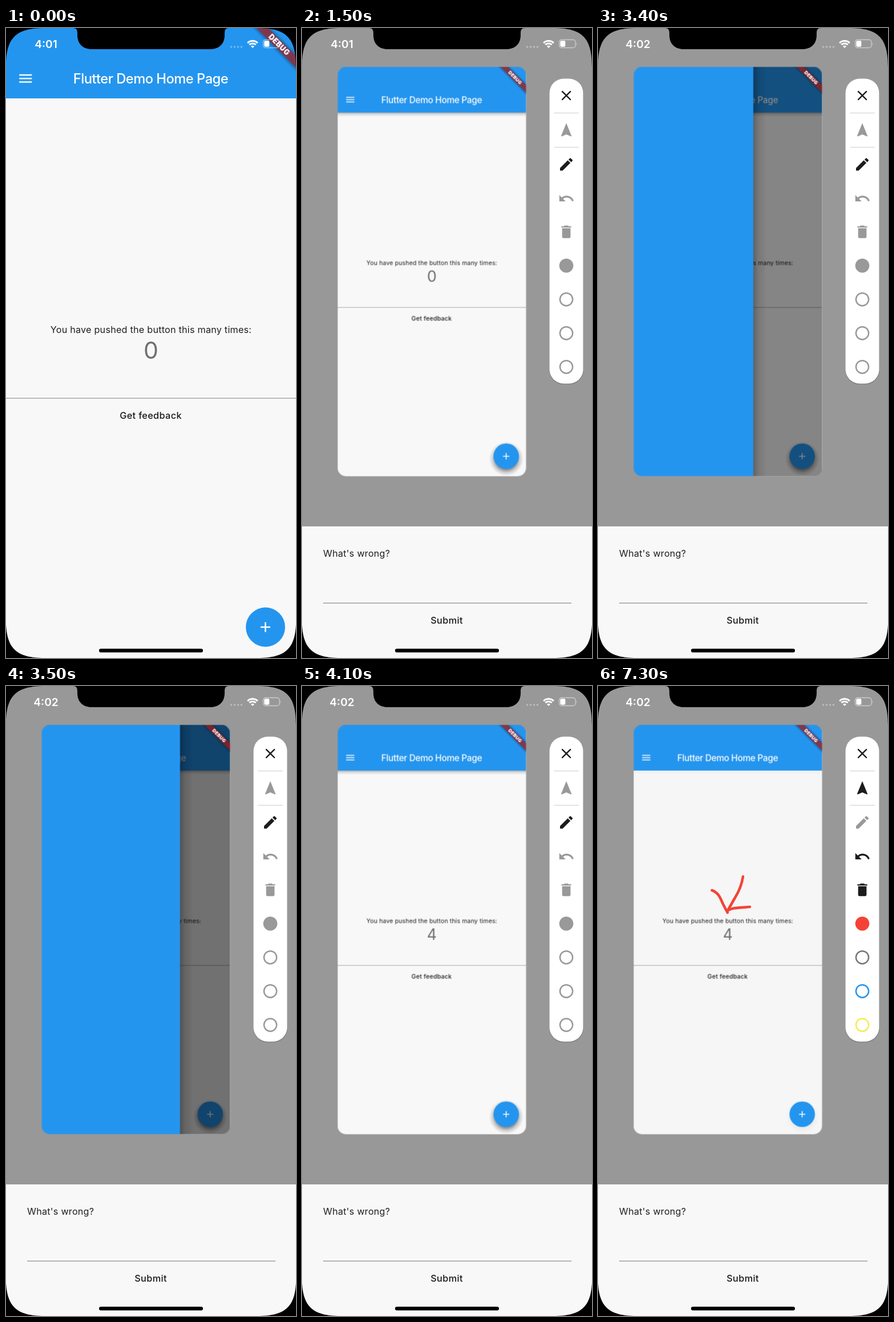
An HTML page that plays this animation: 508x1101 px, repeating every 8000 ms.

```html
<!DOCTYPE html>
<html lang="en">
<head>
<meta charset="utf-8">
<title>Feedback demo</title>
<style>
  html, body { margin: 0; width: 100%; height: 100%; overflow: hidden; background: #989898; }
  svg { display: block; width: 100vw; height: 100vh; font-family: Inter, sans-serif; }
  text { white-space: pre; }
  .mid { text-anchor: middle; }
  .body { font-size: 16.2px; letter-spacing: .22px; fill: #1f1f1f; }
  .btn { font-size: 16.3px; font-weight: 500; letter-spacing: .35px; fill: #1a1a1a; }
  .clock { font-size: 19.2px; font-weight: 600; fill: #fff; }

  /* every part shares one 8 s clock; most changes are hard cuts */
  .card, .round, .press, .shade, .paper, .count, .scrim, .drawer,
  .sheet, .tools, .tool, .early, .late { animation: 8s step-end infinite; }

  .card { animation-name: fit; }
  @keyframes fit {
    0% { transform: translate(0px, 0px) scale(1); }
    17.5% { transform: translate(20px, 38.5px) scale(.917); }
    18.75%, to { transform: translate(62.3px, 67.8px) scale(.65); }
  }
  .round { animation-name: round; }
  @keyframes round { 0% { rx: 0px; ry: 0px; } 17.5% { rx: 5.5px; ry: 5.5px; } 18.75%, to { rx: 23px; ry: 23px; } }
  .press { animation-name: press; }
  @keyframes press { 0% { opacity: 0; } 17.5% { opacity: 1; } 18.75%, to { opacity: 0; } }
  .shade { animation-name: shade; }
  @keyframes shade { 0% { opacity: 0; } 17.5% { opacity: 1; } 72.5%, to { opacity: .12; } }
  .paper { animation-name: paper; }
  @keyframes paper { 0% { fill: #f8f8f8; } 72.5%, to { fill: #f6f6f6; } }
  .count { animation-name: count; }
  @keyframes count {
    0% { transform: translateY(0px); }
    31.25% { transform: translateY(-60px); }
    32.5% { transform: translateY(-120px); }
    35% { transform: translateY(-180px); }
    37.5%, to { transform: translateY(-240px); }
  }
  .drawer { animation-name: drawer; }
  @keyframes drawer {
    0% { transform: translateX(-40px); }
    42.5% { transform: translateX(322.6px); }
    43.75% { transform: translateX(373px); }
    50% { transform: translateX(302.6px); }
    51.25%, to { transform: translateX(-40px); }
  }
  .scrim { animation-name: scrim; }
  @keyframes scrim {
    0% { opacity: 0; }
    42.5% { opacity: .467; }
    43.75% { opacity: .54; }
    50% { opacity: .438; }
    51.25%, to { opacity: 0; }
  }
  .sheet { animation-name: sheet; }
  @keyframes sheet { 0% { opacity: 0; } 17.5%, to { opacity: 1; } }
  .tools { animation-name: tools; }
  @keyframes tools { 0% { opacity: 0; } 18.75%, to { opacity: 1; } }
  .early { animation-name: early; }
  @keyframes early { 0% { opacity: 1; } 37.5%, to { opacity: 0; } }
  .late { animation-name: late; }
  @keyframes late { 0% { opacity: 0; } 37.5%, to { opacity: 1; } }

  /* toolbar colours: navigating, then drawing */
  .tool { --nav: #999; --draw: #1c1c1c; fill: currentColor; animation-name: mode; }
  .pencil { --nav: #1c1c1c; --draw: #999; }
  .ring { fill: none; stroke: currentColor; stroke-width: 2.5; }
  @keyframes mode { 0% { color: var(--nav); } 61.25%, to { color: var(--draw); } }

  .ink path {
    fill: none; stroke: #f44336; stroke-width: 4.6; stroke-linecap: round; stroke-linejoin: round;
    stroke-dasharray: 1 2; animation: 8s linear infinite;
  }
  .ink .shaft { animation-name: shaft; }
  .ink .left { animation-name: left; }
  .ink .right { animation-name: right; }
  @keyframes shaft {
    0% { stroke-dashoffset: 1.02; }
    72.5% { stroke-dashoffset: 1.02; animation-timing-function: steps(4); }
    77.5%, to { stroke-dashoffset: 0; }
  }
  @keyframes left {
    0% { stroke-dashoffset: 1.02; }
    78.75% { stroke-dashoffset: 1.02; animation-timing-function: steps(3); }
    82.5%, to { stroke-dashoffset: 0; }
  }
  @keyframes right {
    0% { stroke-dashoffset: 1.02; }
    86.25% { stroke-dashoffset: 1.02; animation-timing-function: steps(4); }
    91.25%, to { stroke-dashoffset: 0; }
  }
</style>
</head>
<body>
<svg viewBox="0 0 508 1101" preserveAspectRatio="none">
  <defs>
    <clipPath id="cardClip"><rect class="round" width="508" height="1101"/></clipPath>
    <clipPath id="digitClip"><rect x="224" y="540" width="60" height="50"/></clipPath>
    <linearGradient id="barShade" x2="0" y2="1">
      <stop stop-opacity=".3"/><stop offset=".4" stop-opacity=".12"/><stop offset="1" stop-opacity="0"/>
    </linearGradient>
    <linearGradient id="sideShade">
      <stop stop-opacity=".28"/><stop offset=".4" stop-opacity=".1"/><stop offset="1" stop-opacity="0"/>
    </linearGradient>
    <linearGradient id="bandShade" x2="0" y2="1">
      <stop stop-opacity="0"/><stop offset=".25" stop-opacity=".3"/>
      <stop offset=".75" stop-opacity=".3"/><stop offset="1" stop-opacity="0"/>
    </linearGradient>
    <radialGradient id="fabShade">
      <stop offset=".62" stop-opacity=".42"/><stop offset=".8" stop-opacity=".16"/><stop offset="1" stop-opacity="0"/>
    </radialGradient>
    <path id="corner" d="M0 0H68C17 0 0 17 0 68Z"/>
  </defs>

  <rect width="508" height="1101" fill="#989898"/>

  <!-- app page -->
  <g class="card" clip-path="url(#cardClip)">
    <rect class="paper" width="508" height="1101" fill="#f8f8f8"/>
    <rect class="shade" y="123" width="508" height="11" fill="url(#barShade)"/>
    <rect width="508" height="123" fill="#2495ef"/>
    <path transform="translate(19.5 73.5) scale(1.227)" fill="#fff" d="M3 18h18v-2H3v2zm0-5h18v-2H3v2zm0-7v2h18V6H3z"/>
    <text class="mid" x="253.5" y="97" font-size="23.7" font-weight="500" letter-spacing="-.5" fill="#fff">Flutter Demo Home Page</text>
    <text class="mid body" x="254" y="533">You have pushed the button this many times:</text>
    <g clip-path="url(#digitClip)">
      <g class="count mid" font-size="41" fill="#707070">
        <text x="254" y="578">0</text>
        <text x="254" y="638">1</text>
        <text x="254" y="698">2</text>
        <text x="254" y="758">3</text>
        <text x="254" y="818">4</text>
      </g>
    </g>
    <rect y="646.4" width="508" height="1.3" fill="#9c9c9c"/>
    <rect class="press" x="180" y="656" width="148" height="44" rx="2" fill="#ebebeb"/>
    <text class="mid btn" x="253.5" y="683">Get feedback</text>
    <circle class="shade" cx="454.5" cy="1054" r="46" fill="url(#fabShade)"/>
    <circle cx="454.5" cy="1047" r="34.4" fill="#2495ef"/>
    <path transform="translate(439.7 1032.3) scale(1.227)" fill="#fff" d="M19 13h-6v6h-2v-6H5v-2h6V5h2v6h6v2z"/>

    <rect class="scrim" width="508" height="1101"/>
    <g class="drawer">
      <rect width="34" height="1101" fill="url(#sideShade)"/>
      <rect x="-380" width="380" height="1101" fill="#2495ef"/>
    </g>

    <g transform="translate(508 0) rotate(45)">
      <rect x="-80" y="29" width="160" height="26" fill="url(#bandShade)"/>
      <rect x="-80" y="34.4" width="160" height="14.7" fill="#b71c1c" fill-opacity=".63"/>
      <text class="mid" x="0" y="46.2" font-size="12.5" font-weight="900" letter-spacing=".6" fill="#fff">DEBUG</text>
    </g>
  </g>

  <!-- feedback sheet -->
  <g class="sheet">
    <rect y="871" width="508" height="230" fill="#f8f8f8"/>
    <text class="body" x="37" y="924">What's wrong?</text>
    <rect x="37" y="1004.3" width="435" height="1.4" fill="#999"/>
    <text class="mid btn" x="253.5" y="1040.5">Submit</text>
  </g>

  <!-- toolbar -->
  <g class="tools">
    <rect x="433" y="89.5" width="60" height="533.5" rx="25" fill="#000" fill-opacity=".15"/>
    <rect x="433.5" y="88.5" width="59" height="533" rx="25" fill="#fff"/>
    <path d="M441.5 148.5H485M441.5 208.5H485" stroke="#dcdcdc" stroke-width="1.5"/>
    <path transform="translate(448.3 103.3) scale(1.227)" fill="#1c1c1c" d="M19 6.41 17.59 5 12 10.59 6.41 5 5 6.41 10.59 12 5 17.59 6.41 19 12 13.41 17.59 19 19 17.59 13.41 12z"/>
    <path class="tool" transform="translate(448.3 163.8) scale(1.227)" d="M12 2 4.5 20.29l.71.71L12 18l6.79 3 .71-.71z"/>
    <path class="tool pencil" transform="translate(448.3 223.6) scale(1.227)" d="M3 17.25V21h3.75L17.81 9.94l-3.75-3.75zM20.71 7.04a1 1 0 0 0 0-1.41l-2.34-2.34a1 1 0 0 0-1.41 0l-1.83 1.83 3.75 3.75z"/>
    <path class="tool" transform="translate(448.3 283.3) scale(1.227)" d="M12.5 8c-2.65 0-5.05.99-6.9 2.6L2 7v9h9l-3.62-3.62c1.39-1.16 3.16-1.88 5.12-1.88 3.54 0 6.55 2.31 7.6 5.5l2.37-.78C21.08 11.03 17.15 8 12.5 8z"/>
    <path class="tool" transform="translate(448.3 341.5) scale(1.227)" d="M6 19c0 1.1.9 2 2 2h8c1.1 0 2-.9 2-2V7H6zM19 4h-3.5l-1-1h-5l-1 1H5v2h14z"/>
    <circle class="tool" style="--draw:#f44336" cx="463" cy="415.3" r="12.3"/>
    <circle class="tool ring" style="--draw:#777" cx="463" cy="474.3" r="11.1"/>
    <circle class="tool ring" style="--draw:#2495ef" cx="463" cy="533.3" r="11.1"/>
    <circle class="tool ring" style="--draw:#f9ea4f" cx="463" cy="592.3" r="11.1"/>
  </g>

  <!-- hand-drawn arrow -->
  <g class="ink">
    <path class="shaft" pathLength="1" d="M254 333C252 346 247 359 240 370L228 391"/>
    <path class="left" pathLength="1" d="M199.500 357C211 361 214 370 219 381Q223 389 227 396"/>
    <path class="right" pathLength="1" d="M228 392C236 387 246 388 266 386"/>
  </g>

  <!-- phone frame and status bar -->
  <text class="clock mid early" x="70" y="35">4:01</text>
  <text class="clock mid late" x="70" y="35">4:02</text>
  <path d="M394.500 33H414" stroke="#fff" stroke-opacity=".35" stroke-width="3.6" stroke-linecap="round" stroke-dasharray="0 6"/>
  <g fill="none" stroke="#fff" stroke-width="3">
    <path d="M423.200 26.200A12.500 12.500 0 0 1 440.800 26.200M426.300 29.300A8 8 0 0 1 437.700 29.300"/>
    <path d="M432 35l-3-3a4.200 4.200 0 0 1 6 0z" fill="#fff" stroke="none"/>
  </g>
  <rect x="450.500" y="20.500" width="28.500" height="14" rx="4" fill="none" stroke="#fff" stroke-opacity=".5" stroke-width="1.300"/>
  <path d="M480.300 25.500q2.200 2 0 4.500z" fill="#fff" fill-opacity=".5"/>
  <rect x="452.300" y="22.300" width="9" height="10.400" rx="2" fill="#fff"/>
  <path d="M117 0C123 0 125 3 125 9V12C125 28 135 37 150 37H358C373 37 383 28 383 12V9C383 3 385 0 391 0Z"/>
  <use href="#corner"/>
  <use href="#corner" transform="translate(508 0) scale(-1 1)"/>
  <use href="#corner" transform="translate(0 1101) scale(1 -1)"/>
  <use href="#corner" transform="translate(508 1101) scale(-1 -1)"/>
  <rect x="163" y="1084.800" width="182" height="6.400" rx="3.200"/>
</svg>
</body>
</html>
```
